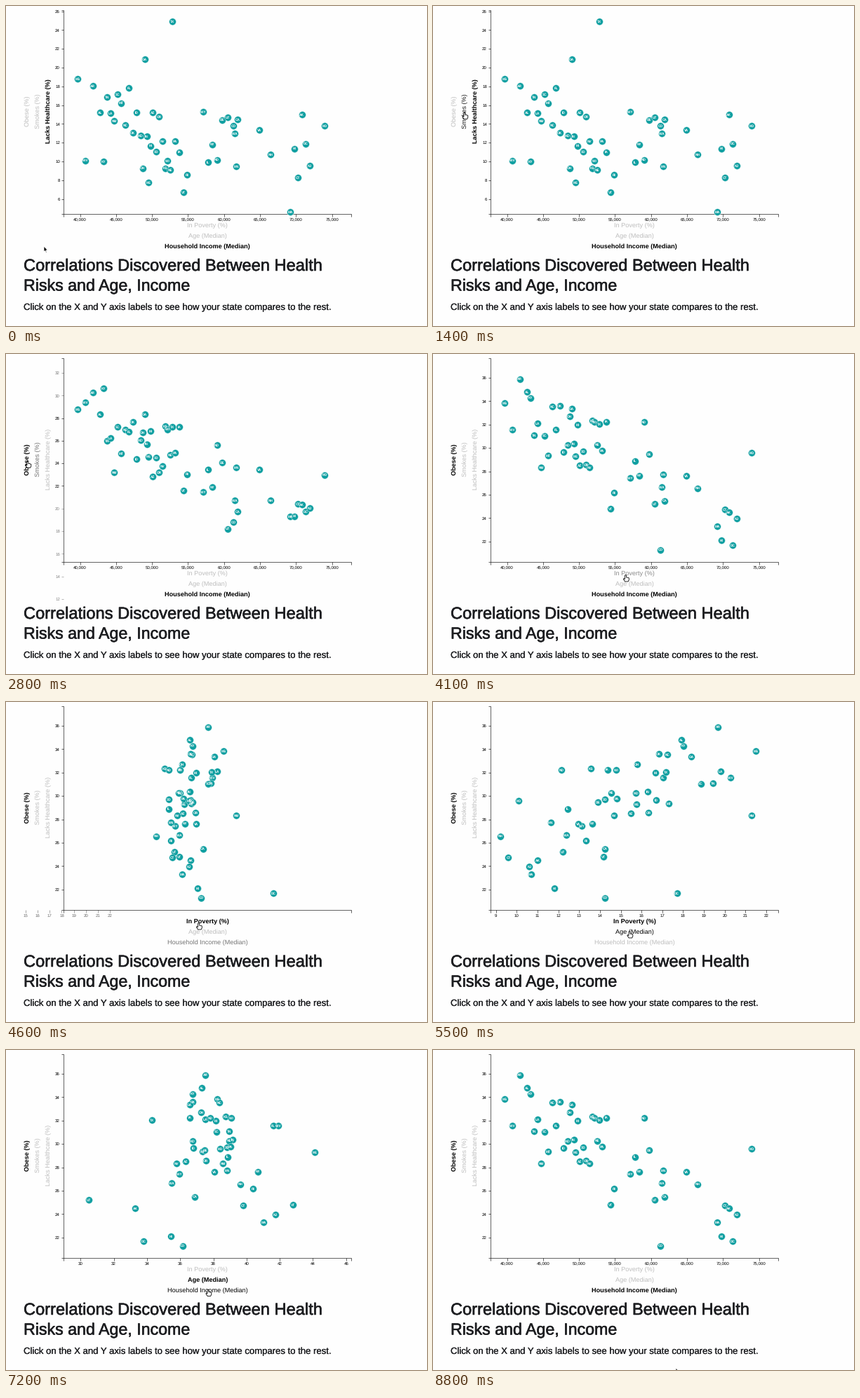
Animation of 600 by 457 pixels, one loop 8.9 s. Source, as a matplotlib script:

```python
import numpy as np
import matplotlib.pyplot as plt
from matplotlib.animation import FuncAnimation
from matplotlib.patches import Polygon
from matplotlib.patheffects import Normal, Stroke

W, H, DPI = 600, 457, 100
STEP, FRAMES = 100, 89
PT = 72 / DPI
plt.rcParams["font.family"] = "Liberation Sans"
plt.rcParams["text.hinting"] = "none"

LEFT, RIGHT, TOP, BOTTOM = 82, 492, 5.6, 297.4
MORPH = 700
TEAL, INK, PALE = "#109fa1", "#1d1e21", .745

# poorest state first
STATES = ("MS WV AR AL KY TN LA NM SC MT NC FL OK ID MO OH GA IN ME MI AZ SD OR NV KS WI "
          "NE TX PA IA VT RI WY IL NY ND DE UT CO WA MN CA VA NH MA HI CT AK DC NJ MD").split()
SOUTH = "WV AR AL KY TN LA MS SC NC FL OK GA TX DE VA DC MD".split()
MIDWEST = "MO OH IN MI SD KS WI NE IA IL ND MN".split()
NORTHEAST = "ME PA VT RI NY NH MA CT NJ".split()

# (rank, thousands of dollars)
INCOME_CURVE = [(0, 39.68), (3, 42.8), (8, 45.2), (14, 48.4), (20, 50.1), (23, 51.45),
                (28, 53.2), (31, 54.9), (32, 57.1), (35, 59), (38, 61.3), (41, 61.9),
                (42, 64.9), (43, 66.5), (44, 69.2), (49, 71.9), (50, 73.97)]

# slope per 10,000 dollars, spread, level by region (S, MW, NE, W), standout states
MODELS = {
    "poverty": (-2.6, .9, (15.5, 14, 14, 15),
                dict(NH=9.2, MS=21.5, NM=21.3, DC=17.7, MD=10.1, LA=19.8)),
    "age": (0, 1.1, (37.9, 37.6, 40.2, 37),
            dict(UT=30.5, ME=44.1, WV=41.9, AK=33.3, DC=33.8, VT=42.8, TX=34.3, FL=41.6)),
    "healthcare": (-1, 1.7, (14.8, 10.5, 9.7, 13.2),
                   dict(MA=4.6, TX=24.9, GA=20.9, AK=15, MS=18.8, VT=6.7, WV=10.1, KY=10)),
    "smokes": (-1.6, 1.4, (19.3, 19.3, 17.5, 16.5),
               dict(UT=9.7, WV=26.7, CA=12.8, KY=26.2)),
    "obesity": (-1.8, 1.3, (30.8, 30.5, 28, 27.2),
                dict(CO=21.3, AR=35.9, ND=32.2, DC=21.7, HI=22.1, MA=23.3, VT=24.8, MD=29.6)),
}

TICKS = {
    "poverty": range(9, 23), "age": range(30, 47, 2), "income": range(40000, 75001, 5000),
    "healthcare": range(6, 27, 2), "smokes": range(10, 29, 2), "obesity": range(22, 37, 2),
}

# (start time, variable) for each axis
X_STEPS = [(-9999, "income"), (4230, "poverty"), (5720, "age"), (7200.5, "income")]
Y_STEPS = [(-9999, "healthcare"), (1410, "smokes"), (2443, "obesity")]

# text, position across the axis, darkness over time
X_LABELS = {
    "poverty": ("In Poverty (%)", 316.2, [(3950, 0), (4500, 1), (5720, 1), (6320, 0)]),
    "age": ("Age (Median)", 331.2, [(4850, 0), (5450, 1), (7200, 1), (7800, 0)]),
    "income": ("Household Income (Median)", 346.2,
               [(4230, 1), (4830, 0), (6050, 0), (6650, 1)]),
}
Y_LABELS = {
    "healthcare": ("Lacks Healthcare (%)", 65.2, [(1410, 1), (2010, 0)]),
    "smokes": ("Smokes (%)", 50.2, [(850, 0), (1380, .9), (2443, 1), (3043, 0)]),
    "obesity": ("Obese (%)", 35.2, [(2150, 0), (2600, 1)]),
}

# time, x, y of the pointer tip at the start and end of each move
POINTER = np.array([
    (100, 54, 343), (500, 56, 205), (650, 56, 205), (950, 45, 152), (1800, 45, 152),
    (2150, 31, 153), (3300, 31, 153), (3950, 274.5, 315.5), (4600, 274.5, 315.5),
    (4850, 280, 327.5), (5720, 280, 327.5), (6050, 288, 342), (7300, 288, 342),
    (7700, 303, 352), (8600, 303, 352), (8800, 346, 454)])
HAND_TIMES = [(850, 3400), (3850, 7500)]
ARROW = np.array([(0, 0), (0, 8), (1.8, 6.5), (3, 9.3), (4.2, 8.8), (3, 6), (5.4, 5.8)])
HAND = .9 * np.array([(0, 0), (1, .5), (1.2, 4), (3, 4), (5.3, 4.9), (5.3, 8), (4, 10.5),
                      (-1, 10.5), (-3.5, 6.6), (-2.8, 5.6), (-1.2, 6.8), (-1, .6)])


def region(state):
    for i, group in enumerate((SOUTH, MIDWEST, NORTHEAST)):
        if state in group:
            return i
    return 3


def make_data():
    """Income by rank; the rest follow income and region, with some scatter."""
    rng = np.random.default_rng(7)
    income = 1000 * np.interp(range(len(STATES)), *zip(*INCOME_CURVE))
    data = {"income": income}
    for name, (slope, spread, levels, standouts) in MODELS.items():
        base = np.array([levels[region(s)] for s in STATES])
        v = base + slope * (income - 55000) / 10000
        v += spread * rng.uniform(-1.5, 1.5, len(STATES))
        v = np.clip(v, min(standouts.values()) + .4, max(standouts.values()) - .4)
        for s, value in standouts.items():
            v[STATES.index(s)] = value
        data[name] = v
    return data


DATA = make_data()

fig = plt.figure(figsize=(W / DPI, H / DPI), dpi=DPI, facecolor="#fefefe")
ax = fig.add_axes([0, 0, 1, 1])
ax.set_xlim(0, W)
ax.set_ylim(H, 0)
ax.axis("off")


def put(x, y, text, size, **kw):
    return ax.text(x, y, text, fontsize=size * PT, **kw)


def heading(y, text, size, weight):
    put(25, y, text, size, color=INK,
        path_effects=[Stroke(linewidth=weight * PT, foreground=INK), Normal()])


def line(xs, ys, **kw):
    return ax.plot(xs, ys, color="black", lw=.6 * PT, solid_capstyle="butt", **kw)[0]


def scale(name, lo, hi):
    a, b = DATA[name].min() * .95, DATA[name].max() * 1.05
    return lambda v: lo + (v - a) / (b - a) * (hi - lo)


def ease(t):
    return 4 * t ** 3 if t < .5 else 1 - 4 * (1 - t) ** 3


def phase(steps, now):
    """Previous variable, current variable and eased progress."""
    i = max(k for k, (start, _) in enumerate(steps) if start <= now)
    e = ease(min((now - steps[i][0]) / MORPH, 1))
    return steps[max(i - 1, 0)][1], steps[i][1], e


def place(old, new, e, lo, hi):
    """Positions of all states, and of the ticks with their opacity."""
    f, g = scale(old, lo, hi), scale(new, lo, hi)
    spots = f(DATA[old]) * (1 - e) + g(DATA[new]) * e
    ticks = []
    for v in sorted(set(TICKS[old]) | set(TICKS[new])):
        fade = (1 - e) * (v in TICKS[old]) + e * (v in TICKS[new])
        if fade > .01:
            ticks.append((v, f(v) * (1 - e) + g(v) * e, fade))
    return spots, ticks


# fixed parts
heading(378, "Correlations Discovered Between Health", 23.65, .6)
heading(406.5, "Risks and Age, Income", 23.2, .6)
heading(434, "Click on the X and Y axis labels to see how your state compares to the rest.",
        13.12, .2)
line([LEFT - 3.5, LEFT, LEFT, LEFT - 3.5], [TOP, TOP, BOTTOM, BOTTOM])
line([LEFT, LEFT, RIGHT, RIGHT], [BOTTOM + 3.5, BOTTOM, BOTTOM, BOTTOM + 3.5])

zeros = np.zeros(len(STATES))
dots = ax.scatter(zeros, zeros, s=(9.8 * PT) ** 2, c=TEAL, edgecolors="#e4f4f4",
                  linewidths=.3, zorder=3)
names = [put(0, 0, s, 4.8, color="white", weight="bold", ha="center", zorder=4)
         for s in STATES]
labels = {}
for key, (text, pos, _) in X_LABELS.items():
    labels[key] = put(287.2, pos, text, 9.2, ha="center")
for key, (text, pos, _) in Y_LABELS.items():
    labels[key] = put(pos, 150.5, text, 9.2, rotation=90, ha="right", va="center")
pointer = ax.add_patch(Polygon(ARROW, closed=True, lw=.6, zorder=9))
live = []


def draw_ticks(xticks, yticks):
    while live:
        live.pop().remove()
    for v, x, fade in xticks:
        if 12 < x < 505:
            live.append(line([x, x], [BOTTOM, BOTTOM + 3.5], alpha=fade))
            live.append(put(x, 306.7, f"{v:,}", 6.1, ha="center", alpha=fade))
    for v, y, fade in yticks:
        if 0 < y < 355:
            live.append(line([LEFT - 3.5, LEFT], [y, y], alpha=fade))
            live.append(put(LEFT - 5, y + 2.2, str(v), 6.1, ha="right", alpha=fade))


def draw_pointer(now):
    x, y = (np.interp(now, POINTER[:, 0], POINTER[:, k]) for k in (1, 2))
    hand = any(a <= now < b for a, b in HAND_TIMES)
    pointer.set_xy((HAND if hand else ARROW) + (x, y))
    pointer.set_facecolor("white" if hand else "black")
    pointer.set_edgecolor("black" if hand else "white")


def update(i):
    now = i * STEP
    x_old, x_new, ex = phase(X_STEPS, now)
    y_old, y_new, ey = phase(Y_STEPS, now)
    xs, xticks = place(x_old, x_new, ex, LEFT, RIGHT)
    ys, yticks = place(y_old, y_new, ey, BOTTOM, TOP)
    dots.set_offsets(np.column_stack([xs, ys]))
    for t, x, y in zip(names, xs, ys):
        t.set_position((x, y + 1.8))
    draw_ticks(xticks, yticks)
    for key, (_, _, keys) in {**X_LABELS, **Y_LABELS}.items():
        dark = np.interp(now, *zip(*keys))
        labels[key].set_color((PALE * (1 - dark),) * 3)
        labels[key].set_fontweight("bold" if key in (x_new, y_new) else "normal")
    draw_pointer(now)
    return [dots, pointer, *names, *labels.values(), *live]


anim = FuncAnimation(fig, update, frames=FRAMES, interval=STEP, init_func=lambda: update(0),
                     repeat=True, repeat_delay=0, blit=False)
plt.show()
```
